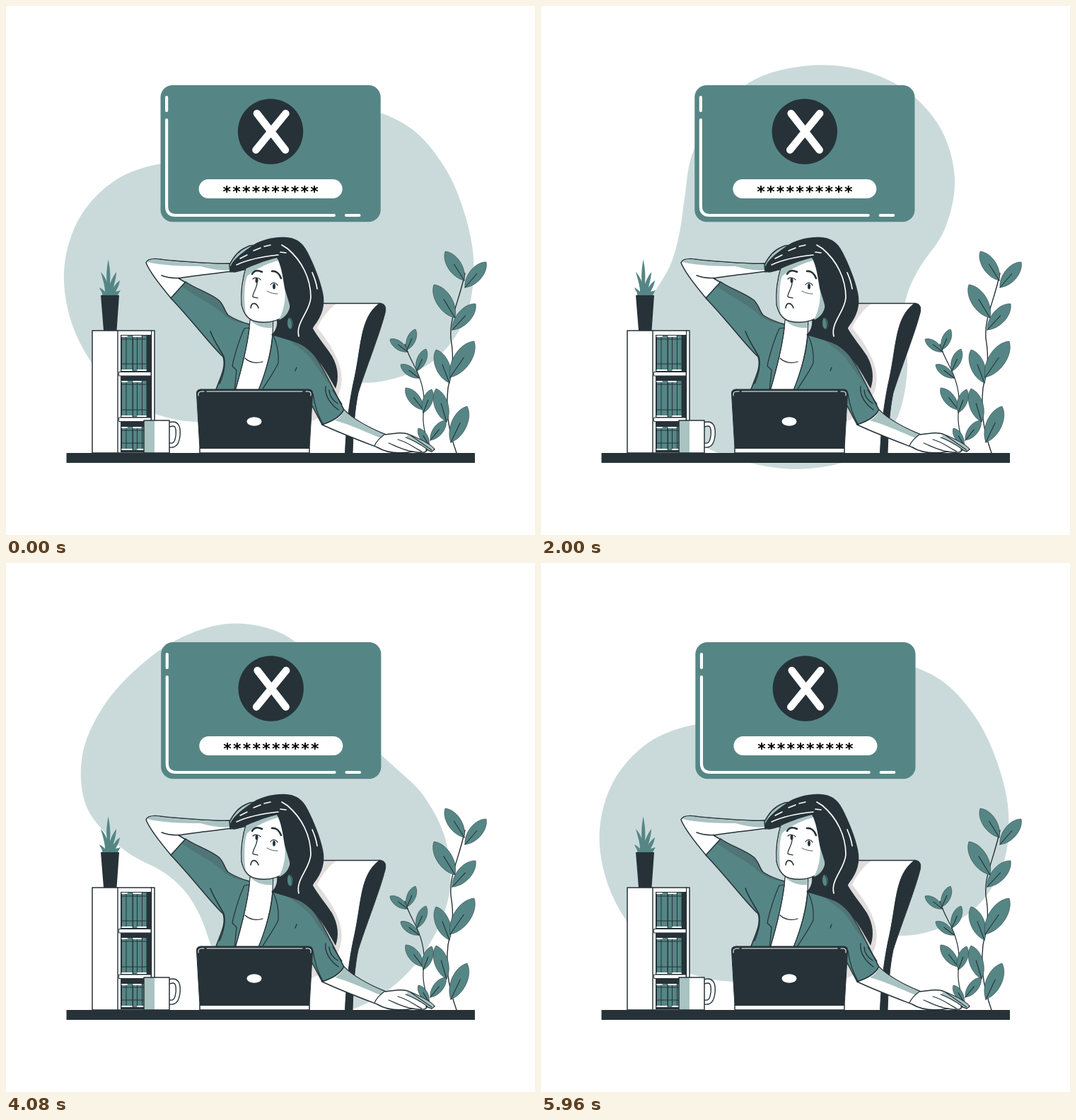
An HTML page with a canvas for the animation above (6 s loop, 748x748 px).

```html
<!DOCTYPE html>
<html lang="en">
<head>
<meta charset="utf-8">
<title>Wrong password</title>
<style>
  html, body { margin: 0; width: 100%; height: 100%; overflow: hidden; background: #fff; }
  canvas { display: block; width: 748px; height: 748px; }
</style>
</head>
<body>
<canvas id="stage" width="748" height="748"></canvas>
<script>
const stage = document.getElementById('stage');
const LOOP = 6000, SHAKE = 3000;
const DARK = '#263238', TEAL = '#558685', PALE = '#cadada', TINT = '#a9c3c2',
      WHITE = '#fff', GREY = '#e1dddd', SHADE = 'rgba(70,85,88,.34)';
let ctx;

// d: SVG path, fill and stroke may be null
function shape(d, fill, stroke, width = 1.5) {
  const p = new Path2D(d);
  if (fill) { ctx.fillStyle = fill; ctx.fill(p); }
  if (stroke) { ctx.strokeStyle = stroke; ctx.lineWidth = width; ctx.stroke(p); }
}
const line = (d, width = 1.5, color = DARK) => shape(d, null, color, width);

function rect(x, y, w, h, fill, stroke, width = 1.5) {
  shape(`M${x} ${y}h${w}v${h}h${-w}Z`, fill, stroke, width);
}
function round(x, y, w, h, r, fill) {
  ctx.beginPath();
  ctx.roundRect(x, y, w, h, r);
  ctx.fillStyle = fill;
  ctx.fill();
}
function oval(x, y, rx, ry, fill, turn = 0) {
  ctx.beginPath();
  ctx.ellipse(x, y, rx, ry, turn, 0, Math.PI * 2);
  ctx.fillStyle = fill;
  ctx.fill();
}

// Background blob: radius every 15 degrees, joined by a closed spline
const RADII = [290.5, 287.5, 268, 229, 189, 181.5, 194, 223, 251, 273, 283.5, 289.5,
               288.5, 275, 247, 207, 165, 152, 163, 208, 257, 280, 286, 287.5];
const blob = (() => {
  const n = RADII.length, path = new Path2D();
  const at = i => {
    const k = (i + n) % n, a = k / n * Math.PI * 2;
    return [RADII[k] * Math.cos(a), RADII[k] * Math.sin(a)];
  };
  path.moveTo(...at(0));
  for (let i = 0; i < n; i++) {
    const [a, b, c, d] = [at(i - 1), at(i), at(i + 1), at(i + 2)];
    path.bezierCurveTo(b[0] + (c[0] - a[0]) / 6, b[1] + (c[1] - a[1]) / 6,
                       c[0] - (d[0] - b[0]) / 6, c[1] - (d[1] - b[1]) / 6, c[0], c[1]);
  }
  path.closePath();
  return path;
})();

function drawBlob(turn) {
  ctx.save();
  ctx.translate(371, 368.5);
  ctx.rotate(turn * Math.PI * 2);
  ctx.fillStyle = PALE;
  ctx.fill(blob);
  ctx.restore();
}

// Sideways shake, one key every tenth of its period
const KEYS = [0, -1, 2, -4, 4, -4, 4, -4, 2, -1, 0];
function shakeAt(t) {
  const p = ((t + SHAKE - 16) % SHAKE) / SHAKE * 10, i = Math.floor(p);
  return 1.45 * (KEYS[i] + (KEYS[i + 1] - KEYS[i]) * (p - i));
}

function drawCard(dx) {
  ctx.save();
  ctx.translate(dx, 0);
  round(218.6, 112, 311.2, 193.3, 17, TEAL);
  line('M227.2 129V148M227.2 161V283Q227.2 296 240 296H464M481 296H499.5', 4.2, WHITE);
  oval(374.1, 177.5, 46.2, 46.2, DARK);
  line('M355 152L395 203.5M395.5 152L353.5 203.5', 10.5, WHITE);
  round(272.7, 245, 203, 27, 13.5, WHITE);
  ctx.fillStyle = '#000';
  ctx.font = 'bold 22px "DejaVu Sans", sans-serif';
  ctx.textAlign = 'center';
  for (let i = 0; i < 10; i++) ctx.fillText('*', 312.3 + i * 13.75, 269.8);
  ctx.restore();
}

function drawChair() {
  shape('M446 421H527C510 440 505 470 498 505C488 545 484 590 480 632H430V440Z', WHITE);
  shape('M467 421C456 429 446 442 440 455C464 484 478 512 474 535C470 560 452 580 430 588V421Z', GREY);
  line('M446 420.5H530');
  shape('M528 420.5C536 420 538 426 536 434C529 462 508 515 498 547C493 570 491 600 490 632H479.5C481 596 485 560 493 525C503 478 501 440 528 420.5Z', DARK, DARK, 1);
}

function drawArm() {
  shape('M317 364C290 365 260 362 225 359C209 356 200 357 198 363C203 376 218 395 234 414L254 391L244 385C264 381 292 379 320 375Z', WHITE, DARK);
  shape('M317 365C290 366 260 363 225 360C210 357 202 358 200 362C220 367 250 368 275 368C290 372 304 375 320 373Z', TINT);
  line('M220 381C230 385 237 385 245 384.5');
  shape('M316 366C322 354 330 345 340 341C346 338 352 338 356 341L342 372L317 376Z', TINT, DARK);
}

function drawJacket() {
  shape('M254 390C268 400 287 405 301 416C309 424 309 432 314 437C323 443 332 447 344 450L377 464C398 472 417 475 430 486C444 501 462 541 478 571C472 581 460 588 447 592L430 560V548H295C302 526 312 512 307 496C291 482 268 450 233 413Z', TEAL, DARK);
  shape('M254 391C268 400 287 406 300 416C308 424 309 432 313 437L342 449C328 450 312 442 303 432C290 421 270 412 249 397Z', SHADE);
  shape('M400 472C416 474 428 480 434 491C446 505 456 526 464 541C452 530 442 514 431 498C420 486 409 480 400 472Z', SHADE);
  line('M289 460C294 474 303 486 308 496C311 508 308 520 302 534');
  line('M434 548C436 562 441 579 448 591M452 538C450 551 459 563 470 571M457 543C457 551 463 559 469 562M462 543L475 563', 1.3);
  line('M411 511L409 516', 1.3);
}

function drawChest() {
  shape('M345 444L344 456C341 480 333 514 324 544H357C368 516 375 490 377 463L378 438Z', WHITE, DARK, 1.2);
  shape('M346 445C357 449 369 447 378 441L376 455C366 456 354 453 346 445Z', TINT);
  shape('M344 455L337 456C329 473 322 498 320 509L326 515L323 544H324C334 510 341 481 344 455Z', TEAL, DARK, 1.2);
  shape('M377 464C384 478 386 491 385 505C379 518 370 530 362 543H357C368 516 376 489 377 464Z', TEAL, DARK, 1.2);
  line('M338 498C344 504 354 506 363 503', 1.3);
}

function drawHead() {
  // loose hair behind the neck
  shape('M381 437C386 448 382 460 375 465C391 470 405 472 416 478C438 490 452 516 466 541C471 527 470 511 461 495C452 481 440 467 434 456L437 440L410 400Z', DARK);
  // face
  shape('M340 368C334 386 332 407 333 422C336 435 343 444 353 446C369 449 384 446 396 437C405 428 404 412 396 397L386 350Z', WHITE, DARK, 1.4);
  shape('M340 370C335 386 333 408 334 422C335 428 337 432 339 435C336 414 337 392 341 382C350 374 364 366 384 360V352Z', TINT);
  shape('M394 395C396 412 394 428 386 444C398 439 404 428 400 410Z', TINT);
  // top hair
  shape('M316 372C318 361 331 351 345 341C358 331 378 326 396 327C413 328 421 337 427 349C435 365 444 386 448 405C452 423 447 438 436 452C430 461 424 468 414 471C407 463 402 453 402 442C405 427 398 415 394 399C391 381 389 366 383 356C366 360 346 368 336 373C326 377 319 379 316 372Z', DARK);
  line('M326 366C343 358 365 354 385 352M331 357L341 352M350 346L360 342M365 340L374 338', 1.5, WHITE);
  line('M388 348L396 349M390 338L398 343C418 360 431 385 431 412C430 432 409 448 414 467M433 377C437 386 439 393 440 400', 1.7, WHITE);
  oval(401.5, 449, 4, 8.2, TEAL, -.1);
  line('M399 441C396 448 398 457 402 457C406 456 405 446 401 441', .9);
  // features
  line('M348 379C351 374 356 373 362 376', 2.6);
  line('M376 375C382 374 387 379 389 385', 2.6);
  line('M349 386C352 383 357 384 360 387M374 394C377 390 382 391 384 395', 1.2);
  oval(354.5, 388, 2, 3.8, DARK);
  oval(379, 396.5, 2, 3.9, DARK);
  line('M355 392C354 401 348 407 349 411C351 413 354 412 356 413', 1.3);
  line('M346 427C347 418 354 419 357 427', 1.6);
  line('M369 403C374 406 379 407 384 407', .8);
}

function drawForearm() {
  shape('M478 571C490 583 512 596 537 606C550 604 562 602 570 606C582 611 600 619 606 627L602 630L594 627C597 632 585 632 575 630C559 633 540 633 525 624C499 614 470 603 447 592C460 588 472 582 478 571Z', WHITE, DARK);
  shape('M478 572C490 584 512 596 535 606L530 611C510 603 487 592 465 586C472 582 476 577 478 572Z', TINT);
  shape('M568 606C582 611 599 619 605 626L601 629C589 623 577 616 566 611Z', TINT);
  line('M535 606C528 611 523 617 521 622M541 618C551 622 561 628 575 630M554 613C567 616 576 624 588 630M565 610C577 614 588 621 596 627M572 607L602 628', 1.2);
}

function drawShelf() {
  rect(122, 459, 88, 173, WHITE, DARK);
  rect(162, 465, 44, 166, DARK);
  line('M158 459V632M205.5 459V632', 1.4);
  for (const [top, h] of [[466, 50], [530, 51], [595, 33]]) {
    for (const [x, w] of [[164, 5.5], [170.5, 8], [180, 5], [186, 6], [193, 5.5]]) rect(x, top, w, h, TEAL);
    line(`M164 ${top + 5}H198M164 ${top + h - 10}H198`, 1);
    line(`M164 ${top + 1}H171M180 ${top + 1}H191M164 ${top + h - 1}H178M186 ${top + h - 1}H198`, 1.8, WHITE);
  }
  rect(160, 517.5, 45, 5.5, WHITE, DARK, 1);
  rect(160, 582, 45, 5.5, WHITE, DARK, 1);
  rect(162, 460, 43, 4.5, WHITE);
}

function drawMug() {
  const handle = 'M231 592C240 589 244 593 243.2 606C242 619 238 622 231 621';
  line(handle, 7.4);
  line(handle, 4.6, WHITE);
  rect(195, 586, 36, 46, WHITE);
  rect(195, 586, 15, 46, TINT);
  rect(195, 586, 36, 46, null, DARK);
}

function drawLaptop() {
  rect(274, 625, 155, 7, WHITE, DARK);
  shape('M276 542H428Q434 542 433.5 548L429 625.5H274L269.5 548Q269 542 276 542Z', DARK, DARK, 1);
  line('M272 551Q271 545 277 545H280M284 545H419M424 545H427Q432 545 431 551', 1.1, WHITE);
  oval(351, 587.5, 10.5, 6.2, WHITE);
}

function drawPot() {
  shape('M136 409C137 405 133 402 132 398C136 400 138 402 140 404C140 395 136 384 134 376C140 383 143 389 143 394C141 380 143 369 144.5 358C147 370 148 380 147 393C149 387 153 380 156 376C156 384 153 393 152 398C155 393 158 390 161 388C160 395 157 400 155 404L162 402C160 405 159 407 158 409Z', TEAL);
  shape('M134 409H160L156.5 459H138Z', DARK);
}

// Pointed leaf from its stalk (x, y) to its tip (u, v), with half a rib
function leaf(x, y, u, v) {
  const dx = u - x, dy = v - y, k = .26;
  const p = (a, s) => `${x + dx * a - dy * k * s} ${y + dy * a + dx * k * s}`;
  shape(`M${x} ${y}C${p(.25, 1)} ${p(.8, 1)} ${u} ${v}C${p(.8, -1)} ${p(.25, -1)} ${x} ${y}Z`, TEAL, DARK, .5);
  line(`M${x} ${y}L${p(.55, .04)}`, 1.1);
}

function drawPlants() {
  line('M637 632C624 595 622 570 625 540C631 512 634 500 629 470C627 440 640 420 649 378', 1.4);
  leaf(648, 388, 621, 347);
  leaf(649, 398, 679, 362);
  leaf(635, 441, 605, 394);
  leaf(631, 458, 664, 421);
  leaf(627, 533, 608, 486);
  leaf(628, 525, 662, 474);
  leaf(623, 588, 608, 541);
  leaf(629, 617, 652, 566);
  line('M602 628C594 611 589 596 590 577C594 553 588 531 580 514C573 500 568 492 564 478', 1.2);
  leaf(568, 489, 543, 471);
  leaf(567, 486, 579, 457);
  leaf(581, 516, 594, 485);
  leaf(584, 526, 558, 507);
  leaf(590, 571, 565, 540);
  leaf(590, 575, 602, 542);
  leaf(598, 621, 583, 597);
  leaf(600, 614, 622, 586);
}

function layer(paint) {
  const c = document.createElement('canvas');
  c.width = c.height = 748;
  ctx = c.getContext('2d');
  ctx.lineCap = ctx.lineJoin = 'round';
  paint();
  return c;
}

const scene = layer(() => {
  drawChair();
  drawPlants();
  drawArm();
  drawJacket();
  drawChest();
  drawHead();
  drawForearm();
  drawShelf();
  drawPot();
  drawMug();
  drawLaptop();
  rect(85.5, 632, 577.5, 14, DARK);
});

ctx = stage.getContext('2d');
ctx.lineCap = ctx.lineJoin = 'round';

function frame() {
  const t = performance.now() % LOOP;
  ctx.fillStyle = WHITE;
  ctx.fillRect(0, 0, 748, 748);
  drawBlob(t / LOOP);
  drawCard(shakeAt(t));
  ctx.drawImage(scene, 0, 0);
  requestAnimationFrame(frame);
}
frame();
</script>
</body>
</html>
```
